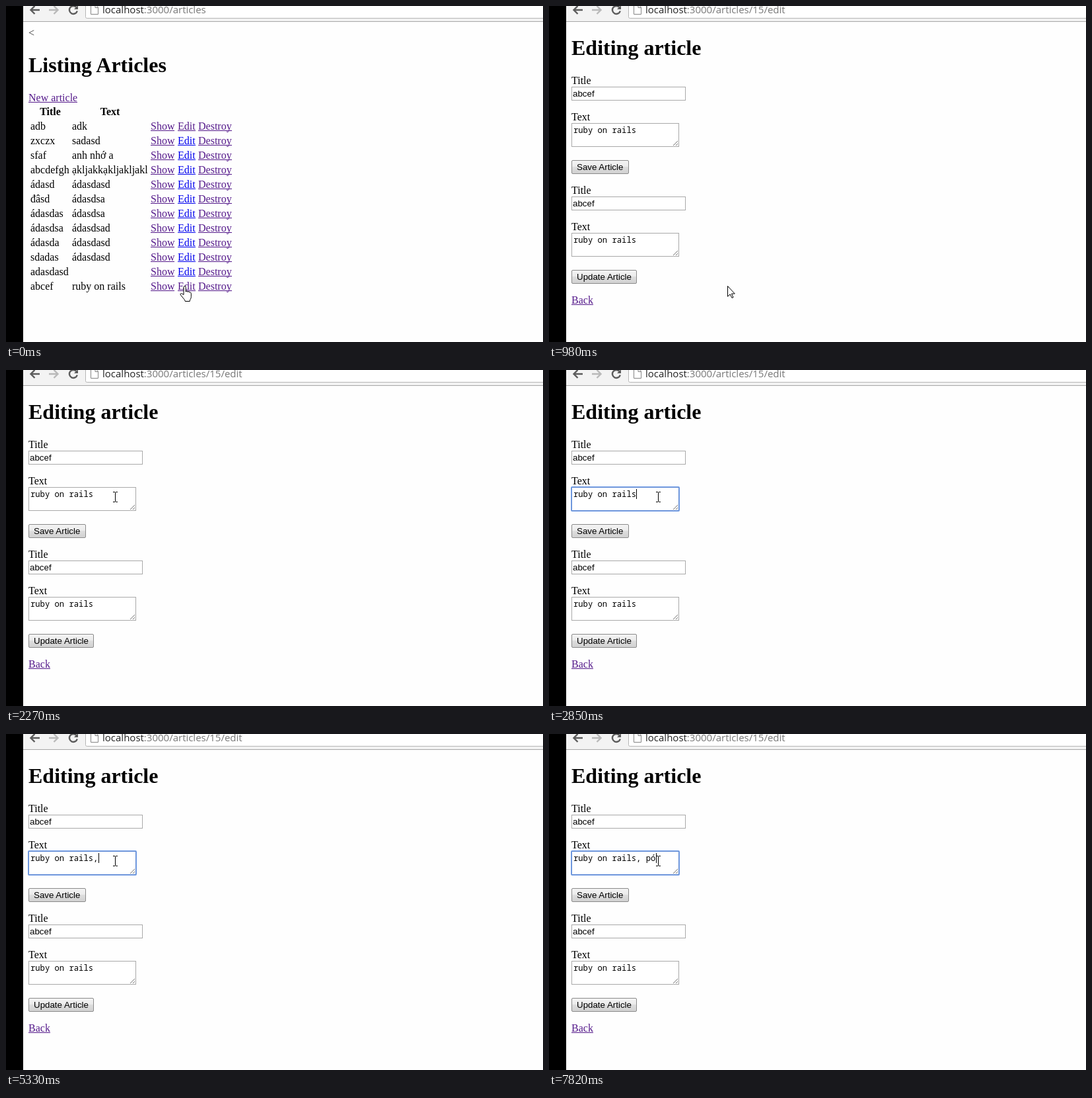
Recreate the animation shown at these times as an HTML page. Size 813 by 508 pixels, loop 8000 ms.

```html
<!DOCTYPE html>
<html lang="en">
<head>
<meta charset="utf-8">
<title>Editing an article</title>
<style>
  html, body { margin: 0; width: 100%; height: 100%; overflow: hidden; background: #fff; }
  svg { display: block; }
  text { white-space: pre; }
  .serif { font: 16px "Liberation Serif", "Times New Roman", serif; }
  .bold { font-weight: bold; }
  .h1 { font-size: 32px; font-weight: bold; }
  .sans { font: 13.333px "Liberation Sans", Arial, sans-serif; }
  .mono { font: 12.2px "Noto Sans Mono", "DejaVu Sans Mono", monospace; }
  .url { font: 15px "Open Sans", "Noto Sans", sans-serif; }
</style>
</head>
<body>
<svg id="stage" width="813" height="508" viewBox="0 0 813 508">
  <defs>
    <linearGradient id="face" x2="0" y2="1">
      <stop offset="0" stop-color="#f4f4f4"/>
      <stop offset=".48" stop-color="#ebebeb"/>
      <stop offset=".5" stop-color="#dedede"/>
      <stop offset="1" stop-color="#d0d0d0"/>
    </linearGradient>
  </defs>
  <rect width="813" height="508" fill="#fefefe"/>
  <g id="toolbar">
    <rect x="26" width="787" height="23" fill="#f3f3f3"/>
    <path d="M120.5 0V16.5q0 2 2 2H813V0z" fill="#fff"/>
    <path d="M120.5 0V16.5q0 2 2 2H813" fill="none" stroke="#b5b5b5"/>
    <path d="M26 23.5H813" stroke="#a6a6a6"/>
    <g fill="none" stroke-width="2.4">
      <path d="M51 6H38M43.5 0L37.5 6L43.5 12" stroke="#5c5c5c"/>
      <path d="M65 6H78M72.5 0L78.5 6L72.5 12" stroke="#b9b9b9"/>
      <path d="M106.5 2A6 6 0 1 0 107.8 7.5" stroke="#5c5c5c"/>
    </g>
    <path d="M109 -1V5H103z" fill="#5c5c5c"/>
    <path d="M128.5 -2.5H135L139.5 2V12.5H128.5zM135 -2.5V2.5H139.5" fill="#fff" stroke="#858585"/>
  </g>
  <g id="list"></g>
  <g id="form"></g>
  <rect width="26" height="508"/>
  <g id="pointers"></g>
</svg>
<script>
const LOOP = 8000;
const VISITED = '#551a8b', UNVISITED = '#0000ee', ACTIVE = '#ee0000';
const $ = id => document.getElementById(id);

function add(parent, tag, attrs, content = '') {
  const node = document.createElementNS('http://www.w3.org/2000/svg', tag);
  for (const key in attrs) node.setAttribute(key, attrs[key]);
  node.textContent = content;
  return parent.appendChild(node);
}

const label = (parent, x, y, content, style = 'serif', extra = {}) =>
  add(parent, 'text', { x, y, class: style, ...extra }, content);

function link(parent, x, y, content, color = VISITED) {
  const group = add(parent, 'g', { fill: color });
  const width = label(group, x, y, content).getComputedTextLength();
  add(group, 'rect', { x, y: y + 1, width: Math.round(width), height: 1 });
  return group;
}

const box = (parent, x, y, width, height, attrs) =>
  add(parent, 'rect', { x: x + .5, y: y + .5, width: width - 1, height: height - 1,
    fill: '#fff', stroke: '#a9a9a9', ...attrs });

// Address bar
const address = label($('toolbar'), 146, 11, '', 'url');
add(address, 'tspan', { fill: '#222' }, 'localhost');
const path = add(address, 'tspan', { fill: '#777' });

// Article list
const list = $('list');
label(list, 34, 46, '<', 'serif', { fill: '#333' });
label(list, 34, 100, 'Listing Articles', 'serif h1');
link(list, 34, 144, 'New article');
label(list, 67, 165, 'Title', 'serif bold', { 'text-anchor': 'middle' });
label(list, 157.5, 165, 'Text', 'serif bold', { 'text-anchor': 'middle' });

const articles = [
  ['adb', 'adk'], ['zxczx', 'sadasd'], ['sfaf', 'anh nhớ a'],
  ['abcdefgh', 'ạkljakkạkljakljakl'], ['ádasd', 'ádasdasd'], ['đâsd', 'ádasdsa'],
  ['ádasdas', 'ádasdsa'], ['ádasdsa', 'ádasdsad'], ['ádasda', 'ádasdasd'],
  ['sdadas', 'ádasdasd'], ['adasdasd', ''], ['abcef', 'ruby on rails']
];
let lastEdit;
articles.forEach(([title, body], i) => {
  const y = 187 + 22 * i;
  const visited = i === 0 || i === articles.length - 1;
  label(list, 37, y, title);
  label(list, 100, y, body);
  link(list, 219, y, 'Show');
  lastEdit = link(list, 260, y, 'Edit', visited ? VISITED : UNVISITED);
  link(list, 291, y, 'Destroy');
});

// Edit page: the same form appears twice
const form = $('form');
label(form, 34, 74, 'Editing article', 'serif h1');

function articleForm(top, action, buttonWidth) {
  const group = add(form, 'g', { transform: `translate(0 ${top})` });
  label(group, 34, 118, 'Title');
  box(group, 34, 122, 173, 21);
  label(group, 36, 137, 'abcef', 'sans');
  label(group, 34, 173, 'Text');
  box(group, 34, 177, 163, 36);
  add(group, 'path', { d: 'M188 211L195 204M192 211L195 208', stroke: '#777' });
  box(group, 34, 233, buttonWidth, 21, { rx: 1.5, fill: 'url(#face)', stroke: '#8a8a8a' });
  label(group, 42, 248, action, 'sans');
  return label(group, 37, 192, 'ruby on rails', 'mono');
}
const body = articleForm(0, 'Save Article', 87);
articleForm(166, 'Update Article', 99);
link(form, 34, 450, 'Back');

const ring = add(form, 'rect', { x: 34, y: 177, width: 163, height: 36, rx: 1,
  fill: 'none', stroke: '#4d83e0', 'stroke-width': 2, opacity: .75 });
const caret = add(form, 'rect', { y: 180, width: 1, height: 15 });
const squiggle = add(form, 'path', { fill: 'none', stroke: '#f00',
  d: 'M147 194.5' + 'l1.5 -1l1.5 1'.repeat(5) });

// Mouse pointers, each drawn from its own top left corner
const pointer = attrs => add($('pointers'), 'path', { fill: '#fff', stroke: '#000', ...attrs });
const pointers = {
  hand: pointer({ d: 'M6 13.5V2.2q0-1.7 1.6-1.7t1.6 1.7V9q.4-1.4 1.8-1.1 1.2.2 1.2 1.6.5-1 1.7-.7 1.1.3 1.1 1.6.6-.7 1.5-.3.8.4.8 1.6v5q0 2.2-1.2 3.8-.9 1.2-.9 3H8.2q0-1.6-1.4-3L1.6 14.2q-1.2-1.6-.1-2.4 1-.7 2.4.4z' }),
  arrow: pointer({ d: 'M.5.5V16.2L4.2 12.8L7 18.4L9 17.4L6.4 12H11.3z' }),
  beam: pointer({ d: 'M0 .5H3M4 .5H7M3.5 1V15M0 15.5H3M4 15.5H7' })
};

const moves = [
  [0, 'hand', 263, 423], [300, 'hand', 264, 423], [980, 'arrow', 270, 423],
  [1440, 'arrow', 180, 323], [1590, 'arrow', 134, 232], [1750, 'beam', 151, 190],
  [1890, 'beam', 157, 184], [2140, 'beam', 160, 184], [2270, 'beam', 162, 184]
];

// time, text after "ruby on rails", caret x (0 while blinked off)
const typing = [
  [0, '', 0], [2850, '', 132], [3380, '', 0],
  [3820, ' ', 139], [4380, ' ', 0], [4910, ' ', 139],
  [5060, '', 132], [5330, ',', 140],
  [5610, ', ', 146], [6080, ', ', 0], [6630, ', ', 146], [7160, ', ', 0],
  [7280, ', p', 154], [7400, ', po', 162], [7820, ', pó', 162]
];

const latest = (steps, t) => steps.filter(step => step[0] <= t).pop();
const show = (node, on) => node.setAttribute('visibility', on ? 'visible' : 'hidden');

function render(t) {
  const editing = t >= 980;
  list.style.display = editing ? 'none' : '';
  form.style.display = editing ? '' : 'none';
  path.textContent = ':3000/articles' + (t >= 850 ? '/15/edit' : '');
  lastEdit.setAttribute('fill', t >= 700 && t < 850 ? ACTIVE : VISITED);

  const [, kind, x, y] = latest(moves, t);
  for (const name in pointers) show(pointers[name], name === kind);
  pointers[kind].setAttribute('transform', `translate(${x} ${y})`);

  const [, typed, caretX] = latest(typing, t);
  body.textContent = 'ruby on rails' + typed;
  caret.setAttribute('x', caretX);
  show(caret, caretX);
  show(ring, t >= 2850);
  show(squiggle, t >= 7680 && t < 7820);
}

function tick() {
  render(performance.now() % LOOP);
  requestAnimationFrame(tick);
}
tick();
</script>
</body>
</html>
```
